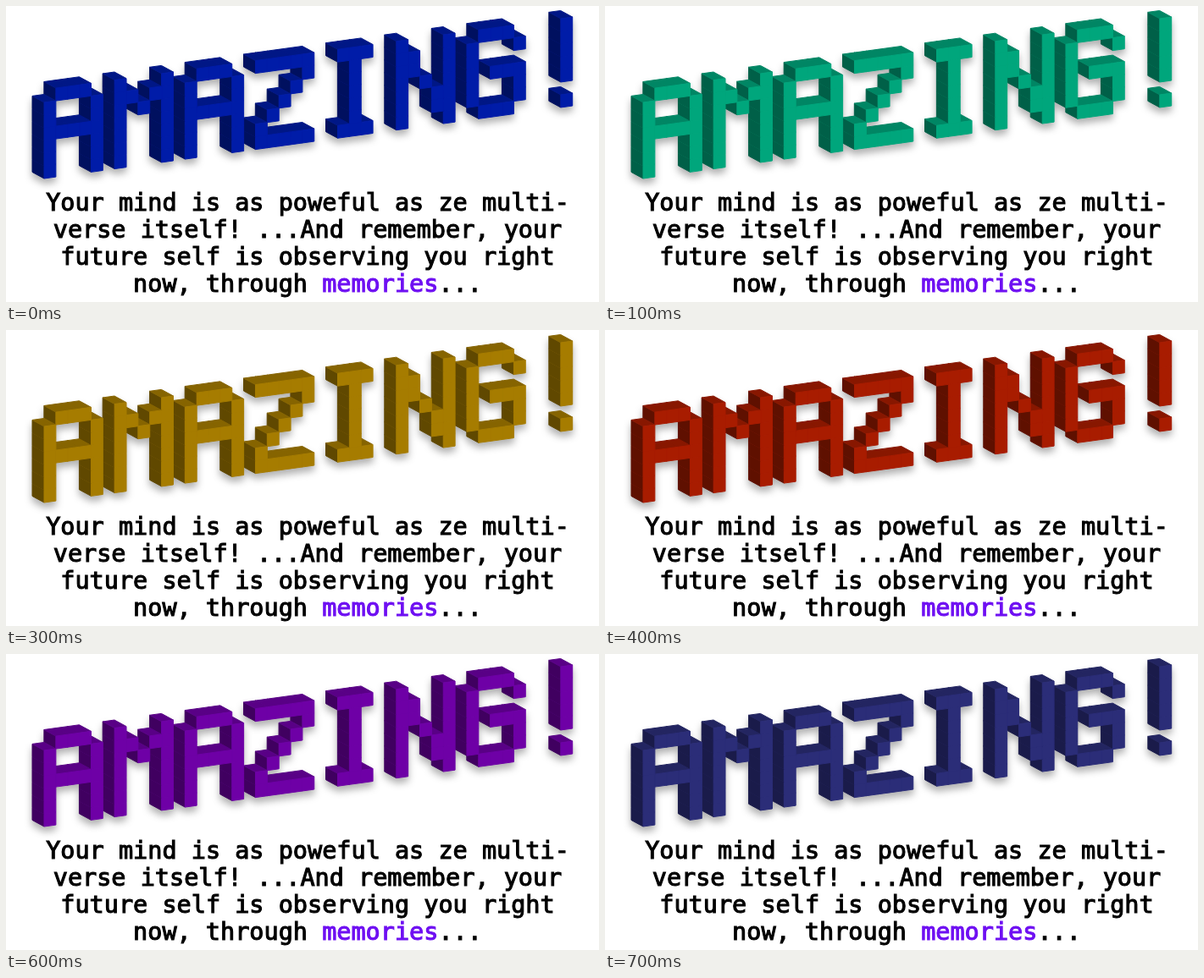
An HTML page with a canvas that plays this animation: 700x350 px, repeating every 0.8 s.

```html
<!DOCTYPE html>
<html lang="en">
<head>
<meta charset="utf-8">
<style>
  html, body { margin: 0; width: 100%; height: 100%; overflow: hidden; background: #fff; }
  canvas { position: absolute; left: 0; top: 0; filter: drop-shadow(0 6px 4px rgba(0, 0, 0, .3)); }
  p {
    position: absolute; left: 12px; right: 0; top: 217px; height: 128px; margin: 0; overflow: hidden;
    font: 28.5px/32px "DejaVu Sans Mono", monospace;
    -webkit-text-stroke: 1.1px; text-align: center; white-space: pre; color: #000;
  }
  b { font-weight: normal; color: #6f10f2; }
</style>
</head>
<body>
<canvas id="title" width="700" height="350"></canvas>
<p>Your mind is as poweful as ze multi-
verse itself! ...And remember, your
future self is observing you right
now, through <b>memories</b>...</p>
<script>
const ctx = document.getElementById('title').getContext('2d');

// AMAZING! as blocks, six columns per letter
const rows = [
  ' ###  #   #  ###  #####  ###  #   #  ###    #  ',
  '#   # ## ## #   #     #   #   ##  # #   #   #  ',
  '#   # # # # #   #    #    #   ##  # #       #  ',
  '##### #   # #####   #     #   # # # # ###   #  ',
  '#   # #   # #   #  #      #   #  ## #   #   #  ',
  '#   # #   # #   # #       #   #  ## #   #      ',
  '#   # #   # #   # #####  ###  #   #  ###    #  '
];

// [front, top, side] for each step
const palettes = [
  ['#001ca8', '#001786', '#00105f'],
  ['#00a67c', '#008664', '#006048'],
  ['#5ca600', '#4a8600', '#356000'],
  ['#a67c00', '#866400', '#604800'],
  ['#a81c00', '#881700', '#5f1000'],
  ['#a6006e', '#860059', '#600040'],
  ['#6e00a6', '#590086', '#400060'],
  ['#2b2d78', '#232561', '#1a1b4a']
];
const STEP = 100;

// Screen position of a grid corner; z = 1 is the back of the block
const project = (c, r, z) => [45 + 13.86 * c - 14 * z, 99 - 1.91 * c + 15 * r - 7.6 * z];

function face(color, ...corners) {
  ctx.fillStyle = ctx.strokeStyle = color;
  ctx.beginPath();
  corners.forEach(p => ctx.lineTo(...project(...p)));
  ctx.closePath();
  ctx.fill();
  ctx.stroke();
}

function block(c, r, [front, top, side]) {
  face(side, [c, r, 0], [c, r, 1], [c, r + 1, 1], [c, r + 1, 0]);
  face(top, [c, r, 0], [c, r, 1], [c + 1, r, 1], [c + 1, r, 0]);
  face(front, [c, r, 0], [c + 1, r, 0], [c + 1, r + 1, 0], [c, r + 1, 0]);
}

function draw(palette) {
  ctx.clearRect(0, 0, 700, 350);
  ctx.lineWidth = 1;
  ctx.lineJoin = 'round';
  // Farthest blocks first: right to left, bottom to top
  for (let c = rows[0].length - 1; c >= 0; c--)
    for (let r = 6; r >= 0; r--)
      if (rows[r][c] === '#') block(c, r, palette);
}

let shown = -1;
function tick() {
  const i = Math.floor(performance.now() / STEP) % palettes.length;
  if (i !== shown) draw(palettes[shown = i]);
  requestAnimationFrame(tick);
}
tick();
</script>
</body>
</html>
```
